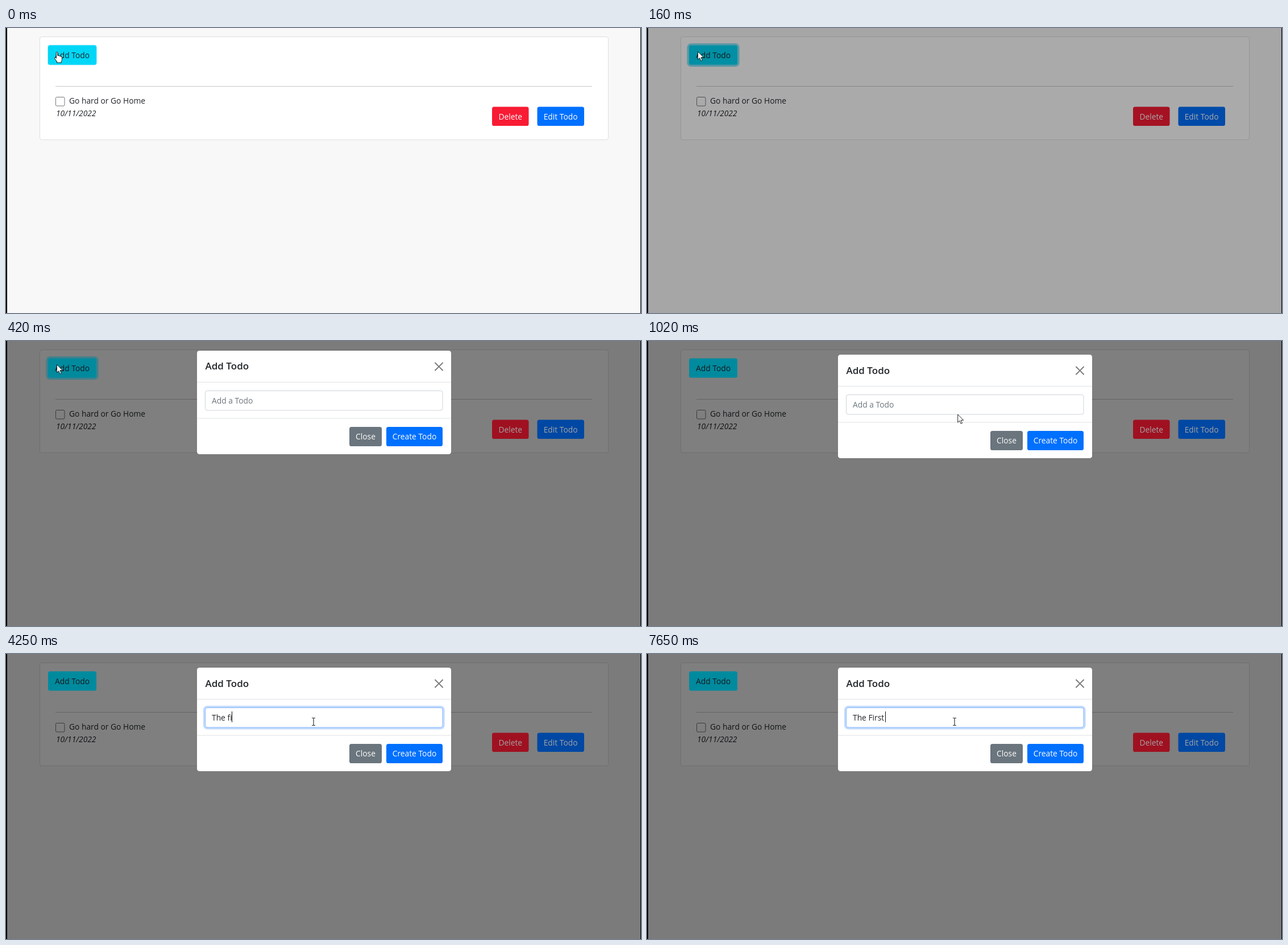
An HTML page for the animation above (8000 ms loop, 1117x501 px).

```html
<!DOCTYPE html>
<html lang="en">
<head>
<meta charset="utf-8">
<title>Add Todo</title>
<style>
  html, body { margin: 0; width: 100%; height: 100%; overflow: hidden; background: #f8f8f8; }
  svg { display: block; }
  text { font: 13.8px "Open Sans", "Noto Sans", sans-serif; fill: #212529; }
  .title { font-size: 17px; font-weight: 600; }
  .date { font-style: italic; }
  .mid { text-anchor: middle; }
  .light { fill: #fff; }
  .hint { fill: #6c757d; }
  .box { fill: #fff; }
  .line { fill: #dee2e6; }
</style>
</head>
<body>
<svg width="1117" height="501" viewBox="0 0 1117 501">
  <rect width="1117" height="501" fill="#f8f8f8"/>
  <rect class="box" x="59.5" y="15.5" width="1000" height="181" rx="3.6" stroke="#dfdfdf"/>
  <rect x="87" y="102" width="944" height="1" fill="#c8c8c8"/>
  <rect class="box" x="87.5" y="121.5" width="15.5" height="15.5" rx="2" stroke="#767676"/>
  <text x="111" y="133">Go hard or Go Home</text>
  <text class="date" x="88" y="155">10/11/2022</text>
  <rect id="backdrop" width="1117" height="501"/>

  <g id="buttons">
    <rect id="ring" x="74" y="30.5" width="85" height="34" rx="3.6" fill="none" stroke="#0dcaf0" stroke-opacity=".5"/>
    <rect x="74" y="30.5" width="85" height="34" rx="3.6" fill="#00d7f7"/>
    <text class="mid" x="116.5" y="53">Add Todo</text>
    <rect x="855" y="138.5" width="64.5" height="33.5" rx="3.6" fill="#f81b34"/>
    <text class="mid light" x="887.3" y="160.8">Delete</text>
    <rect x="934.5" y="138.5" width="82.5" height="33.5" rx="3.6" fill="#0070ff"/>
    <text class="mid light" x="975.6" y="160.8">Edit Todo</text>
  </g>

  <g id="modal">
    <rect class="box" x="336" y="24" width="447" height="182" rx="4.3"/>
    <text class="title" x="350.5" y="57.5">Add Todo</text>
    <path d="M755 45.5l13 13m0-13l-13 13" stroke="#777" stroke-width="1.9" stroke-linecap="round"/>
    <rect class="line" x="336" y="79" width="447" height="1"/>
    <rect id="glow" x="350.5" y="94.5" width="417.5" height="34.5" rx="3.6" fill="none" stroke="#c2dbfe"/>
    <rect id="field" class="box" x="350.5" y="94.5" width="417.5" height="34.5" rx="3.6"/>
    <text id="entry" x="362" y="116.8"></text>
    <rect id="caret" y="101" width="1" height="19" fill="#111"/>
    <rect class="line" x="336" y="142.5" width="447" height="1"/>
    <rect x="604" y="158" width="57" height="34" rx="3.6" fill="#6a757d"/>
    <text class="mid light" x="632.5" y="180.3">Close</text>
    <rect x="669" y="158" width="99" height="34" rx="3.6" fill="#0070ff"/>
    <text class="mid light" x="718.5" y="180.3">Create Todo</text>
  </g>

  <path d="M0 0h2v501h-2zM1116 0h1v501h-1z"/>
  <g id="pointer">
    <path id="hand" fill="#fff" stroke="#111" stroke-linejoin="round"
      d="M-1.2 2.2Q-1.2 .8 .1 .8T1.4 2.2V7Q3.6 6.2 4 7.6 6 6.9 6.5 8.5 9 8 9 10.3V14Q9 16 7.7 17.3V19.5H0V17.5L-4 12.2Q-4.6 10.6-3.3 10.2-2.3 10-1.2 11.8Z"/>
    <path id="arrow" fill="#fff" stroke="#111" stroke-width=".9"
      d="M0 0V14L3.2 11 5.5 16.3 7.8 15.3 5.5 10.2H10Z"/>
    <path id="beam" fill="none" stroke="#333" stroke-width="1.2" d="M-3-6.5h2.2L0-5.8.8-6.5H3M0-5.8V5.8M-3 6.5h2.2L0 5.8.8 6.5H3"/>
  </g>
</svg>
<script>
const LOOP = 8000;
const ticks = [0, 80, 160, 240, 320, 420, 480, 560, 640, 700, 780, 860,
  940, 1020, 1100, 1180, 1560, 1640, 1740];
// [time, text, caret x]; no caret x means the caret is hidden.
const typing = [
  [0, ""], [1560, "", 362], [2040, ""], [2520, "T", 369], [2760, "Th", 377],
  [2920, "The", 385], [3060, "The ", 389], [3610, "The "], [3690, "The f", 393],
  [4250, "The fi", 397], [4760, "The fi"], [4840, "The f"], [5080, "The "],
  [5240, "The ", 389], [5780, "The "], [5860, "The F", 395], [6420, "The F"],
  [6950, "The F", 395], [7030, "The Fi", 399], [7090, "The Fir", 404],
  [7330, "The Firs", 410], [7500, "The First", 415], [7650, "The First ", 419]
];

const el = id => document.getElementById(id);
const set = (id, attrs) => {
  for (const name in attrs) el(id).setAttribute(name, attrs[name]);
};
const show = (id, visible) => set(id, { visibility: visible ? "visible" : "hidden" });
const span = (t, start, length) => Math.min(1, Math.max(0, (t - start) / length));
const mix = (a, b, p) => a + (b - a) * p;
const smooth = p => p * p * (3 - 2 * p);

// cubic-bezier(0, 0, .58, 1), solved by bisection
function easeOut(x) {
  let low = 0, high = 1;
  for (let i = 0; i < 20; i++) {
    const u = (low + high) / 2;
    if (1.74 * (1 - u) * u * u + u ** 3 < x) low = u; else high = u;
  }
  return 3 * (1 - low) * low * low + low ** 3;
}

function drawPointer(t) {
  const across = smooth(span(t, 500, 360));
  const settle = easeOut(span(t, 860, 320));
  const x = mix(mix(89.5, 559, across), 541, settle);
  const y = mix(mix(41.5, 151, across), 119, settle);
  const inField = x > 351 && x < 768 && y > 94 && y < 129;
  set("pointer", { transform: `translate(${x} ${y})` });
  show("hand", t < 80);
  show("arrow", t >= 80 && !inField);
  show("beam", inField);
}

function draw(time) {
  const t = ticks.findLast(tick => tick <= time);
  const fade = span(t, 60, 150);
  set("backdrop", { opacity: fade / 2 });
  el("buttons").style.filter = `brightness(${1 - 0.36 * Math.min(1, 1.4 * fade)})`;
  set("ring", { "stroke-width": 7.2 * span(t, -30, 150) * (1 - span(t, 540, 150)) });

  const drop = -44.7 * (1 - easeOut(span(t, 197, 335)));
  set("modal", { opacity: span(t, 197, 165), transform: `translate(0 ${drop})` });

  const focus = span(t, 1530, 150);
  set("glow", { "stroke-width": 7.2 * focus });
  set("field", { stroke: `rgb(${mix(206, 134, focus)},${mix(212, 183, focus)},${mix(218, 254, focus)})` });

  const [, text, caretX] = typing.findLast(step => step[0] <= time);
  el("entry").textContent = text || "Add a Todo";
  set("entry", { class: text ? "" : "hint" });
  set("caret", { x: caretX || 0 });
  show("caret", caretX);
  drawPointer(t);
}

const start = performance.now();
function frame() {
  draw((performance.now() - start) % LOOP);
  requestAnimationFrame(frame);
}
frame();
</script>
</body>
</html>
```
